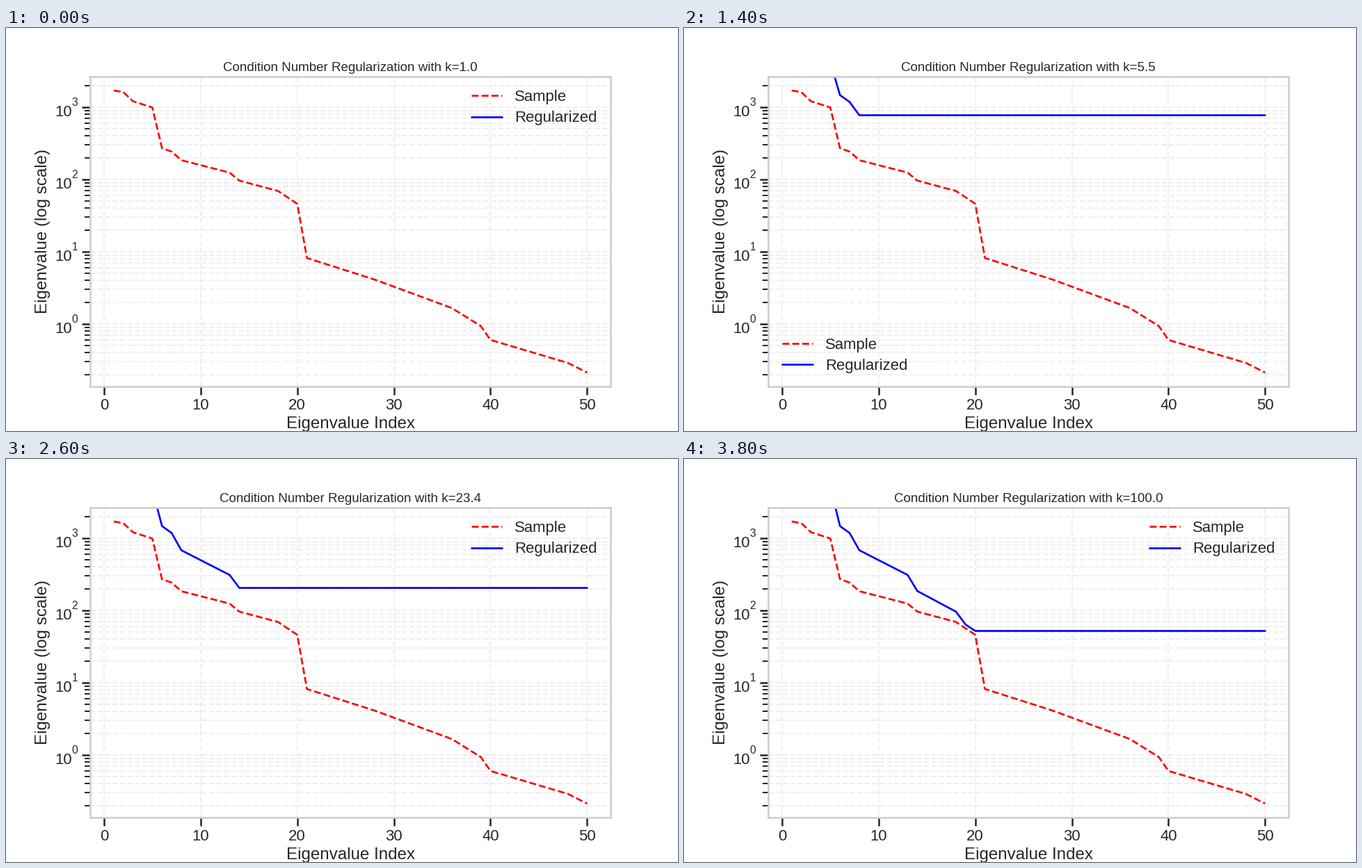
A matplotlib script for the animation above (4 s loop, 966 by 580 pixels).

```python
import matplotlib.pyplot as plt
import numpy as np
from matplotlib.animation import FuncAnimation

W, H, DPI = 966, 580, 100
FRAMES, INTERVAL = 20, 200
N = 50
PT = 0.966  # size of one design point at this dpi
TICK_FONT = 16.5 * PT
INK, EDGE = "0.15", "0.8"

plt.rcParams.update({
    "font.family": "Liberation Sans",
    "text.color": INK,
    "axes.labelcolor": INK,
    "axes.edgecolor": EDGE,
    "axes.linewidth": 1.875 * PT,
    "axes.labelsize": 18 * PT,
    "axes.labelpad": 4 * PT,
    "axes.titlesize": 14 * PT,
    "axes.titlepad": 6 * PT,
    "axes.axisbelow": True,
    "grid.color": EDGE,
    "grid.linewidth": 1.5 * PT,
    "lines.linewidth": 2 * PT,
    "lines.solid_capstyle": "round",
    "legend.fontsize": TICK_FONT,
    "legend.frameon": False,
    "legend.labelspacing": 0.43,
})

# bends of the log10 spectrum, straight in between
KNOTS = [(1, 3.231), (2, 3.207), (3, 3.082), (5, 2.995),
         (6, 2.433), (7, 2.385), (8, 2.266), (13, 2.095), (14, 1.984),
         (18, 1.841), (20, 1.663),
         (21, 0.913), (28, 0.615), (36, 0.221), (39, -0.029),
         (40, -0.221), (48, -0.538), (50, -0.672)]

index = np.arange(1, N + 1)
sample = 10 ** np.interp(index, *zip(*KNOTS))
variance = sample ** 2 / N
kappas = np.logspace(0, 2, FRAMES)


def regularize(values, k):
    """Clip values to [u, k*u] with the likelihood-optimal floor u."""
    low, high = values.min(), values.max()
    for _ in range(60):
        u = np.sqrt(low * high)
        slope = np.minimum(u - values / k, 0) + np.maximum(u - values, 0)
        if slope.sum() > 0:
            high = u
        else:
            low = u
    return np.clip(values, u, k * u)


def tick_text(ax, text, power, dx, dy, size):
    """Place text beside a decade of the y axis, offset in pixels."""
    ax.annotate(text, (0, 10.0 ** power), xycoords=ax.get_yaxis_transform(),
                xytext=(dx, dy), textcoords="offset pixels",
                ha="right", va="baseline", fontsize=size,
                annotation_clip=False)


fig, ax = plt.subplots(figsize=(W / DPI, H / DPI), dpi=DPI, facecolor="white")
fig.subplots_adjust(left=0.125, right=0.9, bottom=0.11, top=0.88)
ax.set_yscale("log")
ax.plot(index, sample, "--", color="red", label="Sample")
ax.set_xlim(ax.get_xlim())
ax.set_ylim(ax.get_ylim())
reg_line, = ax.plot([], [], color="blue", label="Regularized")

ax.tick_params(which="major", length=9 * PT, width=1.875 * PT, pad=3.5 * PT,
               color=INK, labelcolor=INK, labelsize=TICK_FONT)
ax.tick_params(which="minor", length=6 * PT, width=1.5 * PT, color=INK)
ax.tick_params(axis="y", which="both", labelleft=False)
for power in range(4):
    tick_text(ax, "10", power, -26, -13, TICK_FONT)
    tick_text(ax, str(power), power, -17.5, 2, 0.7 * TICK_FONT)

ax.set_xlabel("Eigenvalue Index")
ax.set_ylabel("Eigenvalue (log scale)")
ax.yaxis.set_label_coords(-0.0758, 0.5)
ax.grid(True, which="both", linestyle="--", alpha=0.3)
title = ax.set_title("")
legend = ax.legend(loc="upper right", bbox_to_anchor=(0, -0.0017, 1, 1.0034))


def update(i):
    k = kappas[i]
    reg_line.set_data(index, regularize(variance, k))
    title.set_text(f"Condition Number Regularization with k={k:.1f}")
    # the legend steps aside while the floor crosses its corner
    legend.set_loc("lower left" if 3 <= i <= 9 else "upper right")
    return reg_line, title, legend


anim = FuncAnimation(fig, update, frames=FRAMES, interval=INTERVAL,
                     repeat=True, repeat_delay=0, blit=False)
plt.show()
```
